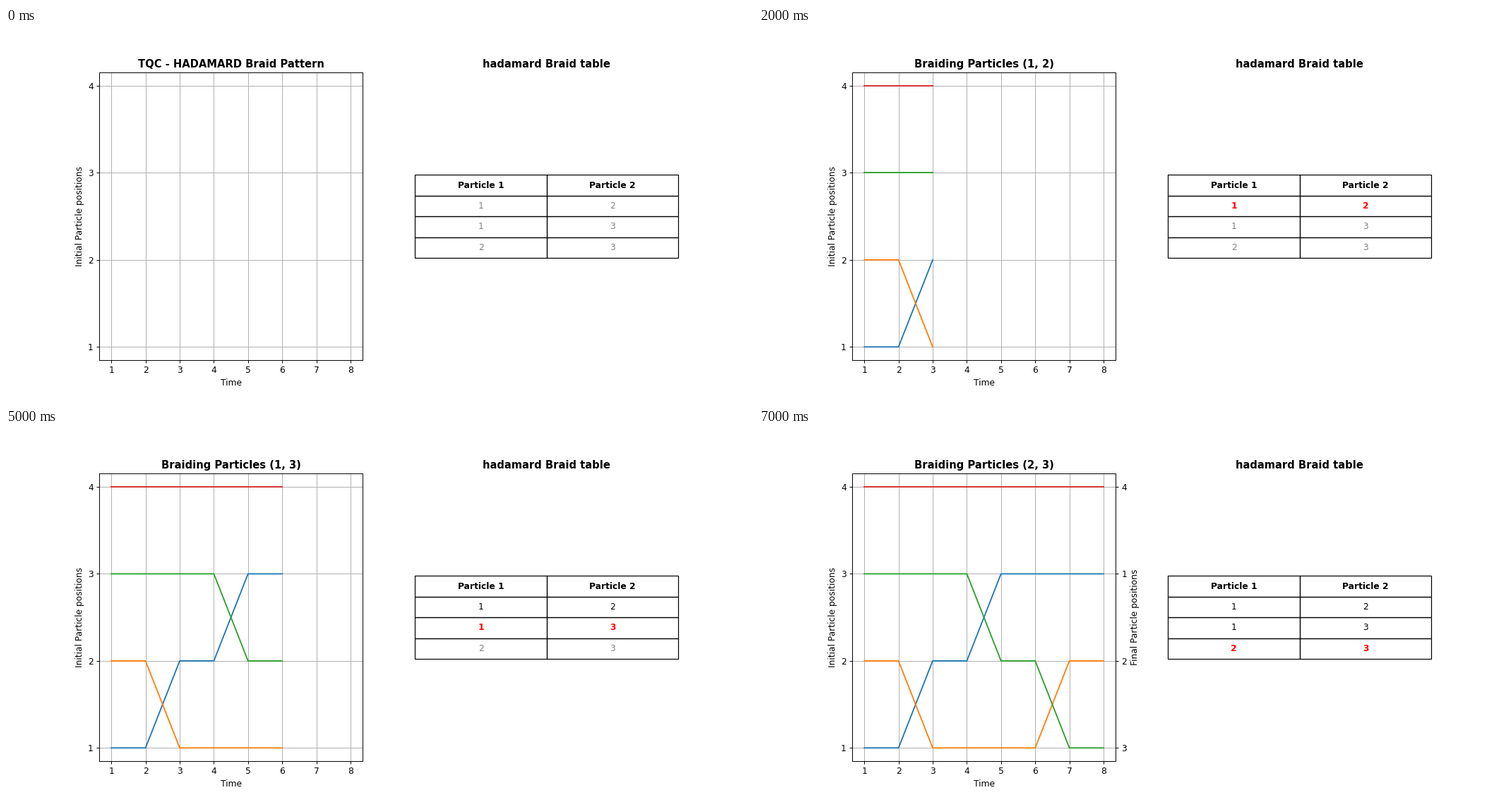
Write a matplotlib script that moves like this. It is 1058 by 529 pixels and loops after 8000 ms.

```python
import matplotlib.pyplot as plt
from matplotlib.animation import FuncAnimation

W, H = 1058, 529
BRAID = [(1, 2), (1, 3), (2, 3)]
COLORS = ["tab:blue", "tab:orange", "tab:green", "tab:red"]
DIM_BG, DIM_GRID, DIM_LINE, DIM_TEXT = "#2d2d2d", "#1c1c1c", "#101010", "#161616"
STEPS = 2 * len(BRAID) + 2


def braid_paths():
    """Position of each particle over time: every swap is followed by a rest."""
    pos = {p: p for p in range(1, 5)}
    paths = {p: [p, p] for p in pos}
    for a, b in BRAID:
        pos[a], pos[b] = pos[b], pos[a]
        for p in pos:
            paths[p] += [pos[p]] * 2
    return paths, pos


paths, final = braid_paths()
times = list(range(1, STEPS + 1))

fig, (ax, ax_table) = plt.subplots(1, 2, figsize=(12, 6), dpi=W / 12)

ax.set_facecolor("none")
ax.set_xlim(0.65, STEPS + 0.35)
ax.set_ylim(0.85, 4.15)
ax.set_xticks(times)
ax.set_yticks(range(1, 5))
ax.set_xlabel("Time")
ax.set_ylabel("Initial Particle positions")
ax.grid(True)
title = ax.set_title("", fontweight="bold")
lines = [ax.plot([], [], color=c)[0] for c in COLORS]

ax_final = ax.twinx()
ax_final.set_ylim(ax.get_ylim())
ax_final.set_yticks([final[p] for p in final])
ax_final.set_yticklabels([str(p) for p in final])
ax_final.set_ylabel("Final Particle positions")

ax_table.axis("off")
ax_table.set_title("hadamard Braid table", fontweight="bold")
table = ax_table.table(cellText=BRAID, colLabels=["Particle 1", "Particle 2"],
                       cellLoc="center", loc="center")
table.auto_set_font_size(False)
table.set_fontsize(10)
table.scale(1, 2)
for (row, _), cell in table.get_celld().items():
    cell.set_facecolor("none")
    if row == 0:
        cell.set_text_props(fontweight="bold")


def style_rows(current, dim):
    for (row, _), cell in table.get_celld().items():
        if row == 0:
            continue
        if row == current:
            cell.set_text_props(color="red", fontweight="bold")
        elif row < current:
            cell.set_text_props(color="black", fontweight="normal")
        else:
            cell.set_text_props(color=DIM_TEXT if dim else "gray",
                                fontweight="normal")


def update(step):
    dim = step == 1
    current = step // 2
    fig.set_facecolor(DIM_BG if dim else "white")
    for g in ax.get_xgridlines() + ax.get_ygridlines():
        g.set_color(DIM_GRID if dim else "#b0b0b0")

    shown = step + 1 if step else 0
    for line, path, color in zip(lines, paths.values(), COLORS):
        line.set_data(times[:shown], path[:shown])
        line.set_color(DIM_LINE if dim else color)

    if current:
        a, b = BRAID[current - 1]
        title.set_text(f"Braiding Particles ({a}, {b})")
    else:
        title.set_text("TQC - HADAMARD Braid Pattern")
    style_rows(current, dim)
    ax_final.set_visible(step == STEPS - 1)
    return lines


anim = FuncAnimation(fig, update, frames=STEPS, interval=1000,
                     repeat=True, repeat_delay=0)
plt.show()
```
